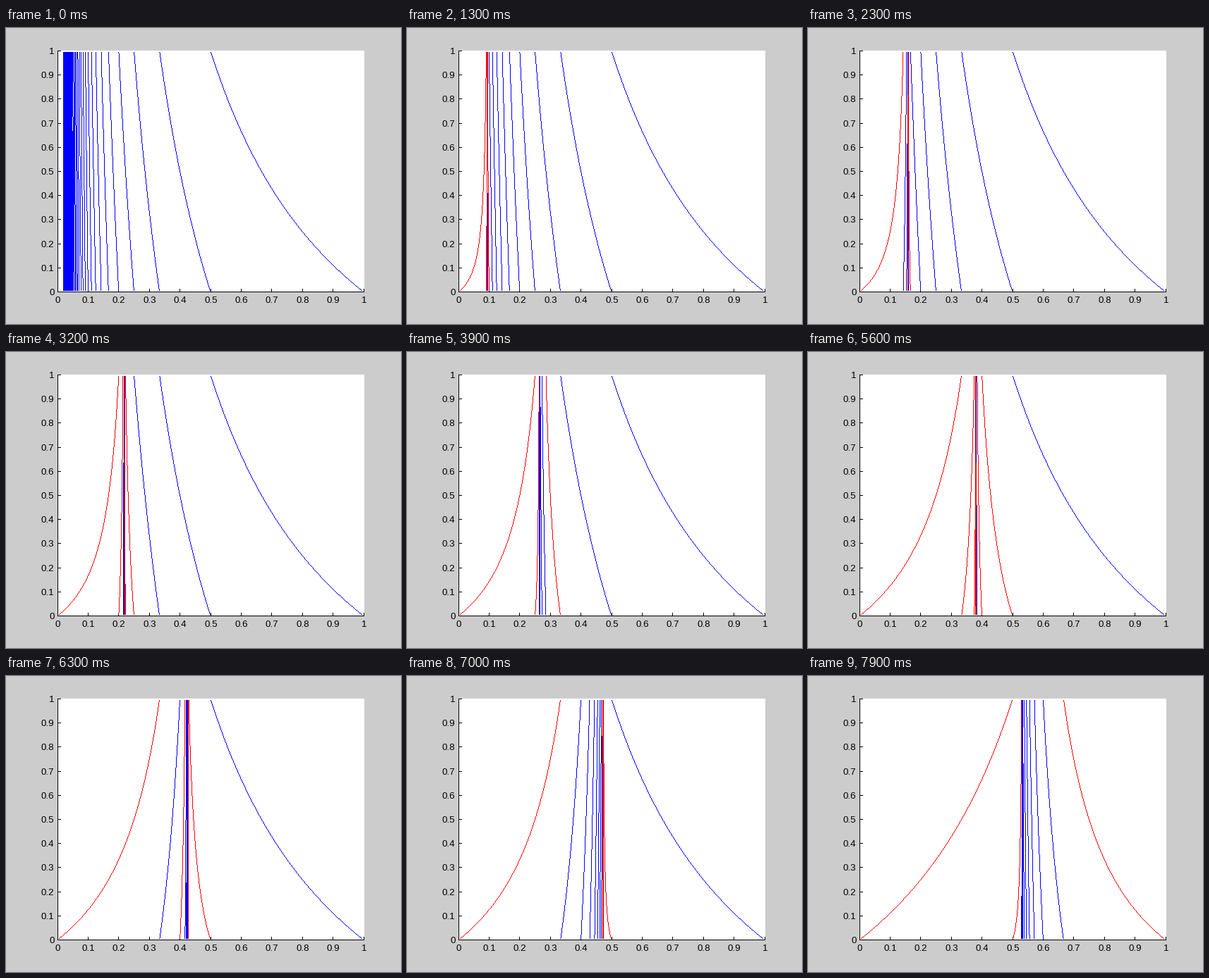
Recreate the animation shown at these times as a matplotlib script. Size 560 by 420 pixels, loop 8000 ms.

```python
import math

import numpy as np
import matplotlib.pyplot as plt
from matplotlib.animation import FuncAnimation

W, H, DPI = 560, 420, 100
PX = 72 / DPI                      # one pixel in points
LEFT, BOTTOM, AW, AH = 73, 374, 434, 342
TOP, RIGHT = BOTTOM - AH, LEFT + AW
FRAMES, STEPS, DENOM = 80, 49, 150
GREY, WHITE, BLACK = (204,) * 3, (255,) * 3, (0,) * 3
BLUE, RED = (0, 0, 255), (255, 0, 0)

# Curves run over these pixel rows; heights are in data units.
ROWS = np.arange(TOP + 2, BOTTOM - 1)
HEIGHTS = (BOTTOM - ROWS) / AH

plt.rcParams["font.family"] = "Liberation Sans"

fig = plt.figure(figsize=(W / DPI, H / DPI), dpi=DPI, facecolor="#cccccc")
ax = fig.add_axes([0, 0, 1, 1])
ax.set_xlim(0, W)
ax.set_ylim(H, 0)
ax.axis("off")


def label(x, y, text, ha):
    ax.text(x, y, text, fontsize=13.33 * PX, ha=ha, va="center_baseline")


def make_base():
    img = np.empty((H, W, 3), np.uint8)
    img[:] = GREY
    img[TOP:BOTTOM + 1, LEFT:RIGHT + 1] = WHITE
    img[TOP:BOTTOM + 1, LEFT] = BLACK
    img[BOTTOM, LEFT:RIGHT + 1] = BLACK
    for k in range(11):
        col = math.floor(LEFT + AW * k / 10)
        row = round(BOTTOM - AH * k / 10)
        img[BOTTOM - 4:BOTTOM, col] = BLACK
        img[row, LEFT:LEFT + 5] = BLACK
        text = f"{k / 10:g}"
        label(col + 0.5, 386, text, "center")
        label(68.5, row + 0.5, text, "right")
    return img


def stroke(img, xs, color):
    """One-pixel line: one dot per row where steep, per column where flat."""
    pos = LEFT + AW * xs
    slope = np.abs(np.gradient(pos))
    steep = slope <= 1
    img[ROWS[steep], np.floor(pos[steep]).astype(int)] = color
    if steep.all():
        return
    order = np.argsort(pos)
    pos, rows, slope = pos[order], ROWS[order], slope[order]
    cols = np.arange(math.floor(pos[0]), math.floor(pos[-1]) + 1)
    flat = np.interp(cols + 0.5, pos, slope) > 1
    at = np.rint(np.interp(cols + 0.5, pos, rows)).astype(int)
    img[at[flat], cols[flat]] = color


def branches(num):
    """Farey walk towards num/DENOM; yields (x values, turned)."""
    p, q, r, s = 0, 1, 1, 1
    was_right = True
    for _ in range(STEPS):
        m, n = p + r, q + s
        right = num * n <= DENOM * m
        if right:
            xs = (r + HEIGHTS * p) / (s + HEIGHTS * q)
            r, s = m, n
        else:
            xs = (p + HEIGHTS * r) / (q + HEIGHTS * s)
            p, q = m, n
        yield xs, right != was_right
        was_right = right


base = make_base()
picture = ax.imshow(base, extent=(0, W, H, 0), interpolation="nearest",
                    aspect="auto", zorder=0)


def update(i):
    img = base.copy()
    curves = list(branches(i + 1))
    for color, wanted in ((BLUE, False), (RED, True)):
        for xs, turned in curves:
            if turned == wanted:
                stroke(img, xs, color)
    picture.set_data(img)
    return (picture,)


anim = FuncAnimation(fig, update, frames=FRAMES, interval=100, repeat=True,
                     repeat_delay=0, blit=False)
plt.show()
```
